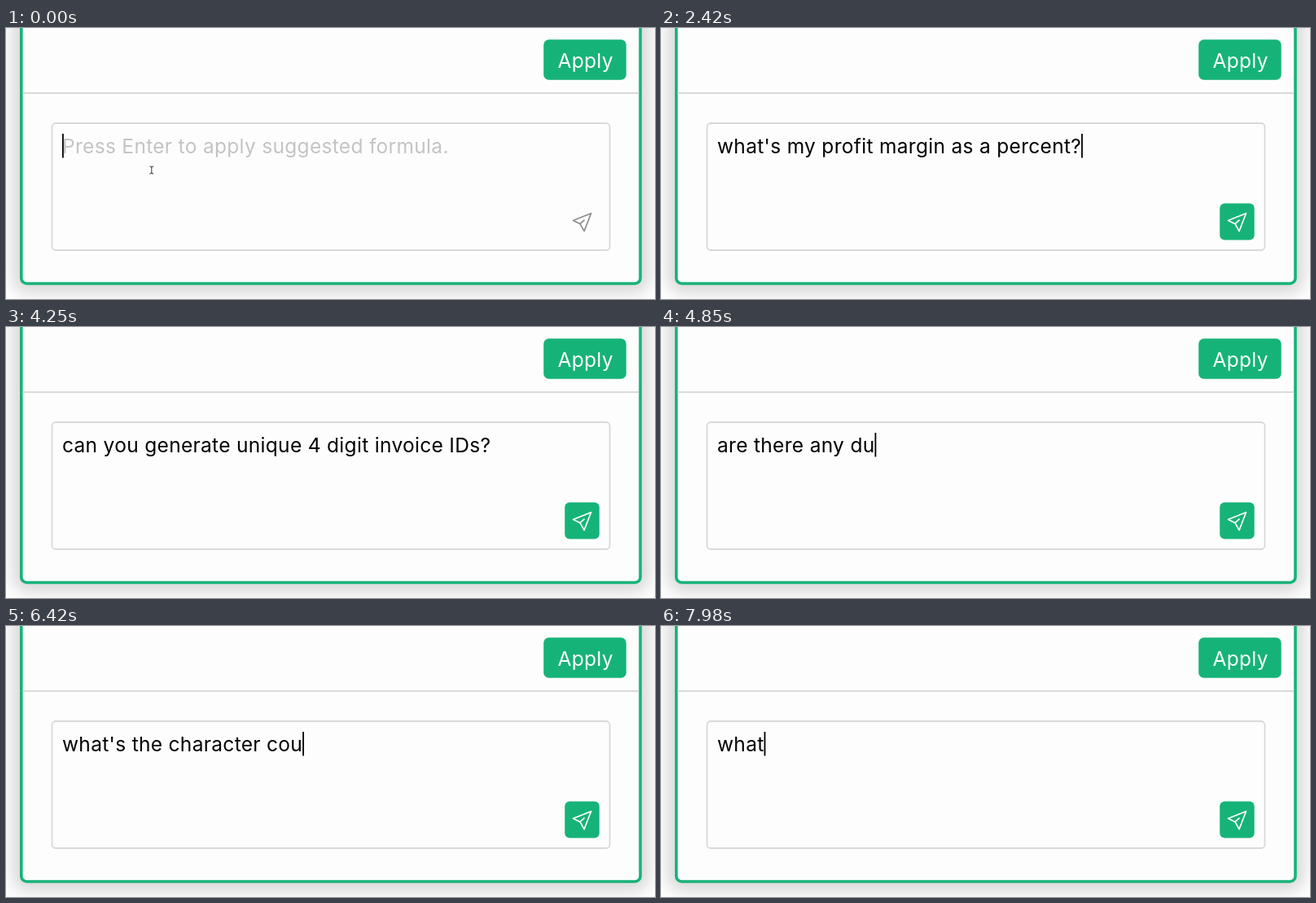
An HTML page for the animation above (8000 ms loop, 797 by 333 pixels).

```html
<!DOCTYPE html>
<html lang="en">
<head>
<meta charset="utf-8">
<title>Formula assistant prompt</title>
<style>
  html, body { margin: 0; width: 100%; height: 100%; overflow: hidden; background: #fff; }
  .shadow {
    position: absolute; left: 18px; top: -60px; width: 762px; height: 375px; border-radius: 8px;
    box-shadow: 0 1px 20px 10px rgba(0, 0, 0, .16);
  }
  svg { position: absolute; left: 0; top: 0; width: 797px; height: 333px; }
  text {
    font: 400 24.5px Inter, "Open Sans", sans-serif;
    font-optical-sizing: none;
    letter-spacing: .31px;
    white-space: pre;
  }
  .card { fill: #fdfdfd; stroke: #16b378; stroke-width: 3.6; }
  .green { fill: #16b378; }
  .line { fill: none; stroke: #d9d9d9; stroke-width: 1.8; }
  .plane { fill: none; stroke: #8c8c8c; stroke-width: 1.7; stroke-linejoin: round; stroke-linecap: round; }
  .active .plane { stroke: #fff; }
  .active .idle, svg:not(.active) .send { display: none; }
</style>
</head>
<body>
<div class="shadow"></div>
<svg id="stage" viewBox="0 0 797 333">
  <rect class="card" x="18.8" y="-60" width="760.2" height="374" rx="6.5"/>
  <path class="line" d="M20.6 80H777.2"/>
  <rect class="green" x="660.2" y="14.3" width="101.5" height="49.4" rx="6.5"/>
  <text x="677.5" y="48.6" fill="#fff">Apply</text>
  <rect class="line" x="56.5" y="117" width="685" height="156" rx="4.5"/>
  <text class="idle" x="69" y="154.1" fill="#c4c4c4">Press Enter to apply suggested formula.</text>
  <text id="typed" x="69" y="154.1" fill="#000"></text>
  <rect id="caret" x="69" y="130" width="1.8" height="29.5"/>
  <path class="idle" d="M176.3 170q2.5 0 2.5 1.5q0 -1.5 2.5 -1.5M178.8 171.5V177.5M176.3 179q2.5 0 2.5 -1.5q0 1.5 2.5 1.5" fill="none" stroke="#444" stroke-width="1.1"/>
  <rect class="green send" x="686.2" y="215.6" width="42.5" height="44.8" rx="6"/>
  <path class="plane" d="M718.5 227.7L696.5 236.5L705 240.7L710 249.7ZM705 240.7L710 236.2"/>
</svg>
<script>
const LOOP = 8000, TYPING_START = 500, STEP = 86.97, TEXT_X = 69;

// Each prompt replaces the last one: first step, characters per step, text.
const prompts = [
  [0, 2.4, "what's my profit margin as a percent?"],
  [23, 2.4, "can you generate unique 4 digit invoice IDs?"],
  [45, 2.6, "are there any duplicate emails?"],
  [60, 2.67, "what's the character count of my product description?"],
  [85, 2, "what's"]
];
const caretOff = [43, 45];

const stage = document.getElementById("stage");
const typed = document.getElementById("typed");
const caret = document.getElementById("caret");

function textAt(step) {
  const prompt = prompts.filter(([first]) => first <= step).pop();
  if (!prompt) return "";
  const [first, rate, text] = prompt;
  return text.slice(0, Math.round(rate * (step - first + 1)));
}

function draw(time) {
  const step = Math.floor((time - TYPING_START) / STEP);
  const text = textAt(step);
  typed.textContent = text;
  stage.classList.toggle("active", text !== "");
  caret.setAttribute("x", TEXT_X + (text ? typed.getComputedTextLength() : 0));
  caret.style.display = step >= caretOff[0] && step < caretOff[1] ? "none" : "";
}

const start = performance.now();
function tick() {
  draw((performance.now() - start) % LOOP);
  requestAnimationFrame(tick);
}
tick();
</script>
</body>
</html>
```
